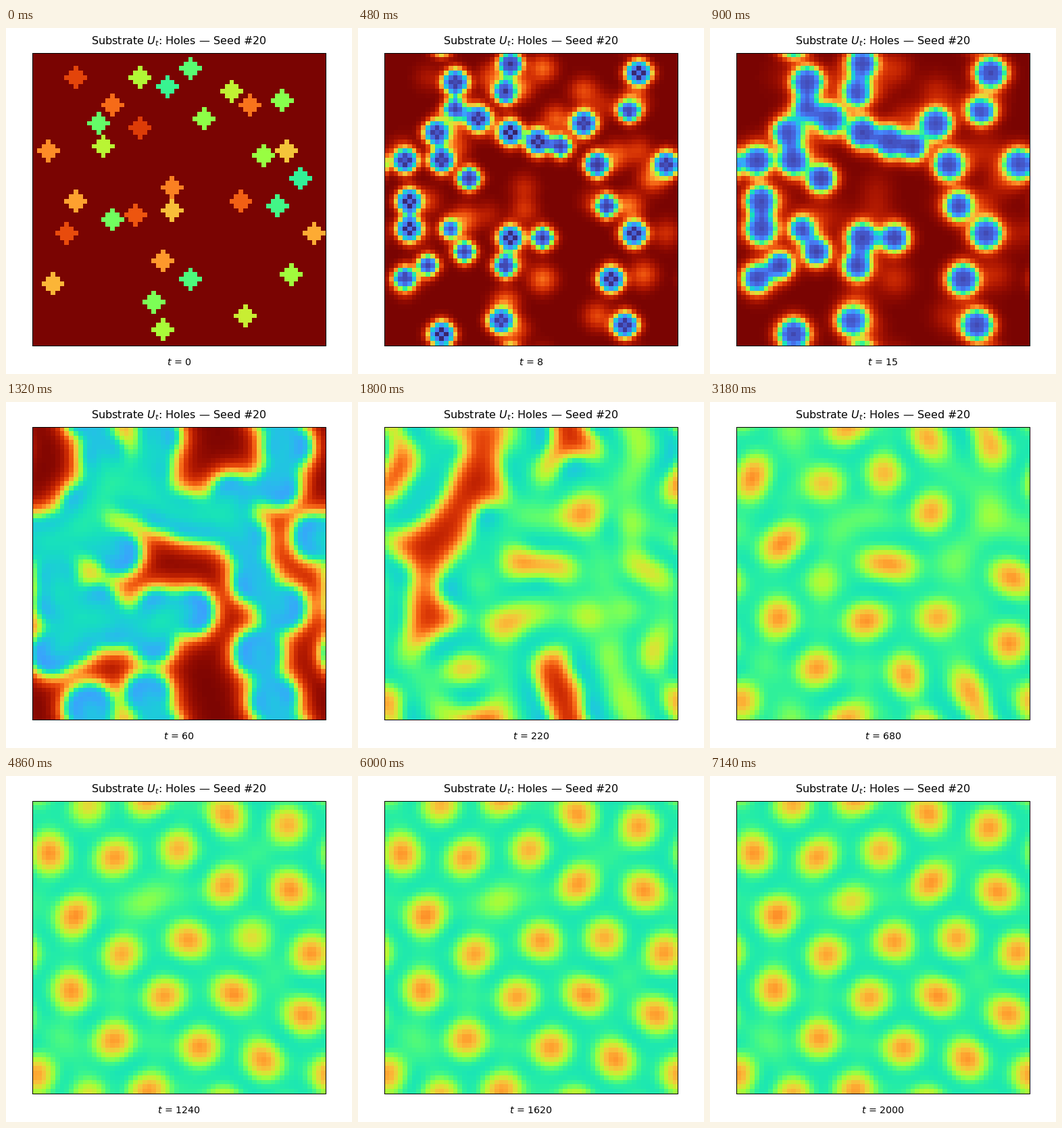
Recreate the animation shown at these times as a matplotlib script. Size 512 by 512 pixels, loop 8 s.

```python
import numpy as np
import matplotlib.pyplot as plt
from matplotlib.animation import FuncAnimation

STAGE, DPI = 512, 128
LEFT, TOP, SIDE = 39.3, 37.1, 433.3      # plot square in stage pixels
N = 64
FEED, KILL, DU, DV = 0.039, 0.058, 0.16, 0.08
TICK, TICKS = 20, 400                    # ms per tick, ticks per loop
TICKS_PER_STATE, STATES = 3, 120

# Disc centres (column, row), each list ordered from the lowest level up
SUBSTRATE = [
    (58, 27), (29, 7), (53, 33), (34, 49), (34, 3), (14, 15), (17, 36),
    (26, 54), (54, 10), (37, 14), (50, 22), (56, 48), (28, 60), (23, 5),
    (15, 20), (43, 8), (46, 57), (55, 21), (30, 34), (4, 50), (61, 39),
    (9, 32), (28, 45), (3, 21), (30, 29), (47, 11), (17, 11), (45, 32),
    (22, 35), (7, 39), (9, 5), (23, 16)]
ACTIVATOR = [
    (14, 38), (9, 46), (17, 43), (38, 20), (34, 40), (18, 27), (48, 33),
    (15, 12), (26, 46), (53, 12), (4, 49), (27, 2), (26, 8), (46, 24),
    (12, 23), (4, 23), (27, 40), (55, 4), (12, 61), (27, 17), (5, 32),
    (5, 38), (49, 49), (52, 59), (11, 17), (15, 6), (25, 58), (43, 15),
    (61, 24), (20, 14), (33, 19), (54, 39)]
SUBSTRATE_LEVELS = np.r_[np.linspace(.375, .555, 17), np.linspace(.645, .85, 15)]
ACTIVATOR_LEVELS = np.linspace(.33, .8, len(ACTIVATOR))


def seeded(background, centres, levels):
    """Flat grid with small discs stamped on it."""
    rows, cols = np.mgrid[:N, :N]
    grid = np.full((N, N), float(background))
    for (col, row), level in zip(centres, levels):
        grid[(cols - col) ** 2 + (rows - row) ** 2 <= 4] = level
    return grid


def laplacian(a):
    return (np.roll(a, 1, 0) + np.roll(a, -1, 0)
            + np.roll(a, 1, 1) + np.roll(a, -1, 1) - 4 * a)


def time_of(state):
    """Single steps at first, then twenty at a time."""
    return state if state < 20 else 20 * (state - 19)


def simulate(times):
    """Gray-Scott reaction on a torus; the substrate at each given time."""
    u = seeded(1, SUBSTRATE, SUBSTRATE_LEVELS)
    v = seeded(0, ACTIVATOR, ACTIVATOR_LEVELS)
    step = 0
    for t in times:
        while step < t:
            uvv = u * v * v
            u, v = (np.clip(u + DU * laplacian(u) - uvv + FEED * (1 - u), 0, 1),
                    np.clip(v + DV * laplacian(v) + uvv - (FEED + KILL) * v, 0, 1))
            step += 1
        yield u


fields = list(simulate(map(time_of, range(STATES))))

plt.rcParams["font.family"] = "DejaVu Sans"
fig = plt.figure(figsize=(STAGE / DPI, STAGE / DPI), dpi=DPI, facecolor="white")
ax = fig.add_axes([LEFT / STAGE, 1 - (TOP + SIDE) / STAGE,
                   SIDE / STAGE, SIDE / STAGE])
image = ax.imshow(fields[0], cmap="turbo", vmin=0, vmax=1,
                  interpolation="nearest", aspect="auto")
ax.set_xticks([])
ax.set_yticks([])
for spine in ax.spines.values():
    spine.set_linewidth(72 / DPI)        # one pixel


def centred(baseline, text, size):
    return fig.text((LEFT + SIDE / 2) / STAGE, 1 - baseline / STAGE, text,
                    fontsize=size, ha="center", va="baseline")


centred(24, "Substrate $U_t$: Holes — Seed #20", 9)
clock = centred(499, "$t$ = 0", 8)


def update(tick):
    state = min(tick // TICKS_PER_STATE, STATES - 1)
    image.set_data(fields[state])
    clock.set_text(f"$t$ = {time_of(state)}")
    return image, clock


animation = FuncAnimation(fig, update, frames=TICKS, interval=TICK,
                          repeat=True, repeat_delay=0)
plt.show()
```
